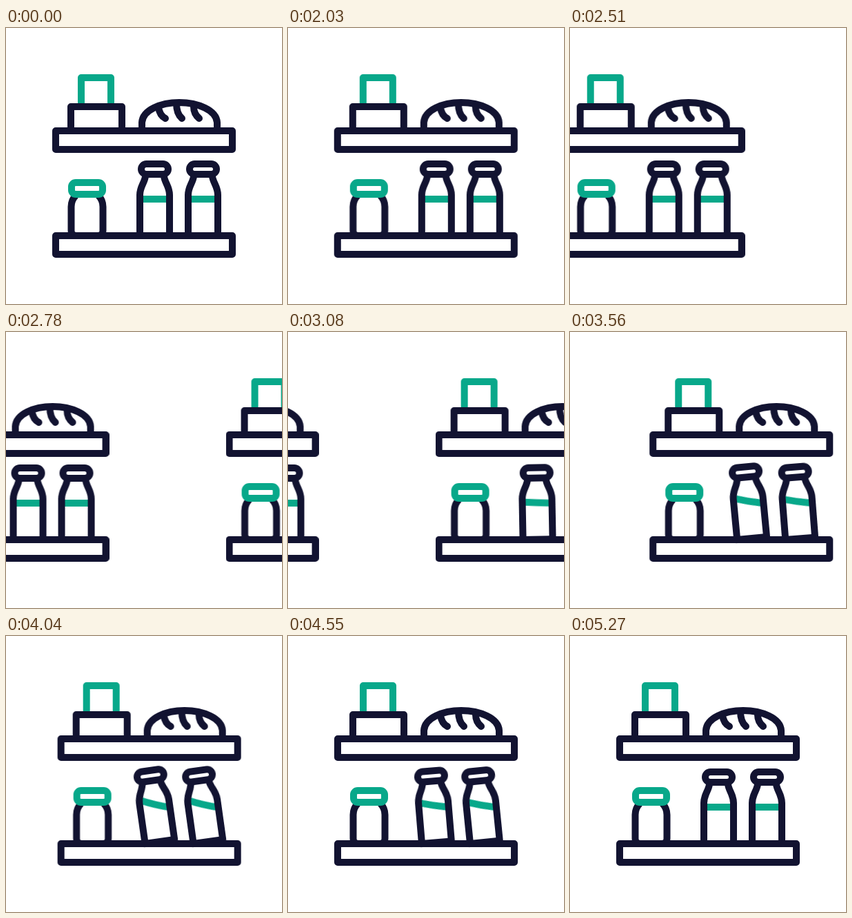
An HTML page that plays this animation: 400x400 px, repeating every 5360 ms.

```html
<!DOCTYPE html>
<html lang="en">
<head>
<meta charset="utf-8">
<title>Grocery shelves</title>
<style>
  html, body { margin: 0; width: 100%; height: 100%; overflow: hidden; background: #fff; }
  svg { display: block; width: 100%; height: 100%; }
  .art {
    fill: none;
    stroke: #121331;
    stroke-width: 10;
    stroke-linejoin: round;
    --loop: 5360ms;
  }
  .green { stroke: #08a88a; }
  .round { stroke-linecap: round; }

  .scroll { animation: scroll var(--loop) infinite; }
  .lean { transform-origin: 194px 301px; animation: lean var(--loop) infinite; }
  .slosh { animation: slosh var(--loop) infinite; }
  .late .lean, .late .slosh { animation-delay: 100ms; }

  @keyframes scroll {
    0% { transform: translateX(0); }
    37.31% { transform: translateX(0); animation-timing-function: cubic-bezier(.333, 0, .295, 1); }
    82.28%, 100% { transform: translateX(-435px); }
  }
  @keyframes lean {
    0% { transform: rotate(0deg); }
    52.24% { transform: rotate(0deg); animation-timing-function: cubic-bezier(.33, 0, .67, 1); }
    75.37% { transform: rotate(-8.1deg); animation-timing-function: cubic-bezier(.33, 0, .67, 1); }
    97.01%, 100% { transform: rotate(0deg); }
  }
  @keyframes slosh {
    0% { d: path("M194 248Q215.5 248 237 248"); }
    52.24% { d: path("M194 248Q215.5 248 237 248"); animation-timing-function: cubic-bezier(.33, 0, .67, 1); }
    75.37% { d: path("M194 237Q215.5 247.5 237 254"); animation-timing-function: cubic-bezier(.33, 0, .67, 1); }
    97.01%, 100% { d: path("M194 248Q215.5 248 237 248"); }
  }
</style>
</head>
<body>
<svg viewBox="0 0 400 400">
  <defs>
    <g id="shelves">
      <!-- boxes -->
      <path class="green" d="M109 112V72H152V112"/>
      <path d="M94 149V114H168V149"/>
      <!-- bread -->
      <path d="M197 149V137C198 119 224 108 251 108S305 119 306 137V149"/>
      <path class="round" d="M221 115C222 122 225 128 231 131M247 109C247 119 250 127 255 131M272 114C272 121 275 127 280 131"/>
      <!-- jar -->
      <path d="M101 243C97 247 94.5 252 94.5 259V293Q94.5 301 102 301H133Q140.5 301 140.5 293V259C140.5 252 138 247 134 243"/>
      <rect class="green" x="95" y="224" width="45" height="17" rx="6"/>
      <!-- boards -->
      <rect x="72" y="149" width="256" height="27"/>
      <rect x="72" y="301" width="256" height="27"/>
    </g>
    <g id="bottle">
      <path d="M202 213V215C201 224 194 230 194 242V301H237V242C237 230 230 224 229 215V213"/>
      <rect x="196" y="197" width="39" height="15" rx="7.5"/>
    </g>
    <g id="still">
      <path class="green" d="M194 248H237"/>
      <use href="#bottle"/>
    </g>
  </defs>

  <g class="art">
    <g class="scroll">
      <use href="#shelves"/>
      <use href="#still"/>
      <use href="#still" x="70"/>

      <g transform="translate(435 0)">
        <use href="#shelves"/>
        <g class="lean">
          <path class="green slosh" d="M194 248Q215.5 248 237 248"/>
          <use href="#bottle"/>
        </g>
        <g class="late" transform="translate(70 0)">
          <g class="lean">
            <path class="green slosh" d="M194 248Q215.5 248 237 248"/>
            <use href="#bottle"/>
          </g>
        </g>
      </g>
    </g>
  </g>
</svg>
</body>
</html>
```
